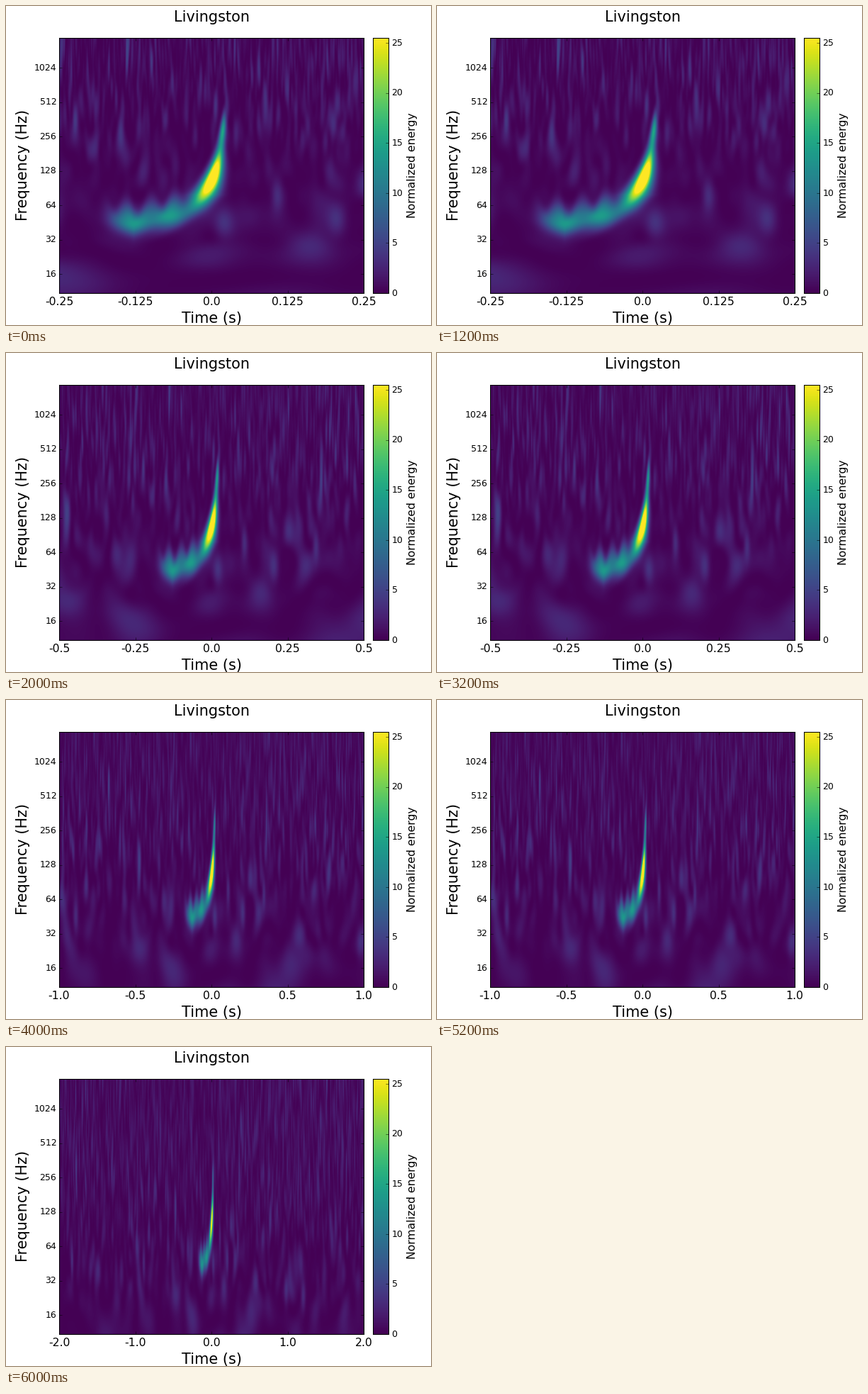
Animation, 600 px wide and 450 px high, one loop 8 s. Source, as a matplotlib script:

```python
import numpy as np
import matplotlib.pyplot as plt
from matplotlib.animation import FuncAnimation

W, H, DPI = 600, 450, 100
LEFT, RIGHT, TOP, BOTTOM = 75, 505.1, 45, 405
BAR_LEFT, BAR_RIGHT = 518, 540
CENTER = (LEFT + RIGHT) / 2
OCTAVE = 48.5          # pixels per octave
ENERGY_MAX = 25.5
COLS, ROWS = 430, 360
ZOOMS = 4
DT = 0.5 / COLS        # seconds per column in the closest view

plt.rcParams["font.family"] = "DejaVu Sans"


def freq_to_y(freq):
    return 87 + (10 - np.log2(freq)) * OCTAVE


def bell(x, sigma):
    return np.exp(-0.5 * (x / sigma) ** 2)


def rise(x, softness):
    return 0.5 + 0.5 * np.tanh(x / (2 * softness))


# The whole record: four seconds, in closest-view pixels around t = 0
half = COLS * 2 ** (ZOOMS - 1) // 2
x = np.arange(2 * half) + 0.5 - half
y = np.arange(ROWS)[:, None] + TOP + 0.5
freq = 2 ** (10 - (y - 87) / OCTAVE)


def tile_width(f):
    """Time spread of the noise, which grows towards low frequencies."""
    return 0.8 + 800 / f


def make_noise():
    rng = np.random.default_rng(14)
    size = (ROWS, 2 * half)
    field = rng.standard_normal(size) + 1j * rng.standard_normal(size)
    field = bell(y - y.T, 19) @ field
    omega = 2 * np.pi * np.fft.fftfreq(2 * half)
    field = np.fft.ifft(np.fft.fft(field, axis=1) * bell(omega * tile_width(freq), 1), axis=1)
    energy = np.abs(field) ** 2
    energy /= energy.mean(axis=1, keepdims=True)
    level = 0.65 + 0.3 * rise(np.log2(freq / 160), 0.4)
    return 6 * np.tanh(energy * level / 6)


def make_chirp():
    """Merger: time left falls as a power of frequency, with a short bright tail."""
    place = 20.4 - 22 * (100 / freq) ** 1.4
    width = np.minimum(12, 8 * (114 / freq) ** 1.1)
    energy = 33 * bell(y - 242, 29) + 12 * bell(y - 176, 15)
    return energy * bell(x - place, width)


def make_inspiral():
    """Low band before the merger, with regular fingers on its upper edge."""
    ridge = 308 - 0.25 * np.abs(x + 110)
    above = 14 + 4 * np.cos(2 * np.pi * (x + 120) / 34)
    beads = 1 + 0.12 * np.cos(2 * np.pi * (x + 110) / 50)
    energy = 12 * beads * rise(x + 140, 7) * rise(-42 - x, 6)
    return energy * bell(y - ridge, np.where(y < ridge, above, 11))


# time (s) and frequency (Hz) of the clearest stray blobs
GLITCHES = [(0.02, 46), (0.107, 80), (0.205, 47), (0.342, 75),
            (-0.89, 45), (-1.83, 48), (0.975, 27), (1.2, 24)]


def make_record():
    record = make_noise() + make_chirp() + make_inspiral()
    for t, f in GLITCHES:
        record += 3 * bell(y - freq_to_y(f), 15) * bell(x - t / DT, tile_width(f) / 2)
    return record


def make_view(record, zoom):
    step = 2 ** zoom
    view = record[:, half - COLS // 2 * step + step // 2:][:, ::step][:, :COLS]
    if zoom:
        edge = np.pad(view, ((0, 0), (1, 1)), mode="edge")
        view = 0.15 * edge[:, :-2] + 0.7 * view + 0.15 * edge[:, 2:]
    return view


fig = plt.figure(figsize=(W / DPI, H / DPI), dpi=DPI, facecolor="white")


def pixel_axes(left, right):
    ax = fig.add_axes([left / W, 1 - BOTTOM / H, (right - left) / W, (BOTTOM - TOP) / H])
    for spine in ax.spines.values():
        spine.set_linewidth(0.75)
    ax.tick_params(direction="in", length=3, width=0.375, labelleft=False,
                   labelbottom=False, labelright=False)
    return ax


def label(px, baseline, text, size, ha="center", rotation=0):
    return fig.text(px / W, 1 - baseline / H, text, size=size, ha=ha, va="baseline",
                    rotation=rotation, rotation_mode="anchor")


record = make_record()
views = [make_view(record, zoom) for zoom in range(ZOOMS)]

ax = pixel_axes(LEFT, RIGHT)
image = ax.imshow(views[0], cmap="viridis", vmin=0, vmax=ENERGY_MAX, aspect="auto",
                  interpolation="bilinear", extent=(LEFT, RIGHT, BOTTOM, TOP))
ax.tick_params(top=True, right=True)
tick_x = np.linspace(LEFT, RIGHT, 5)
ax.set_xticks(tick_x)
bands = [2 ** n for n in range(4, 11)]
ax.set_yticks([freq_to_y(f) for f in bands])
for f in bands:
    label(71.3, freq_to_y(f) + 3.8, str(f), 9, ha="right")
time_labels = [label(px, 421.7, "", 11.25) for px in tick_x]

bar = pixel_axes(BAR_LEFT, BAR_RIGHT)
bar.imshow(np.linspace(0, 1, 256)[:, None], cmap="viridis", aspect="auto",
           origin="lower", extent=(0, 1, 0, ENERGY_MAX))
bar.set_xticks([])
bar.yaxis.tick_right()
bar.tick_params(labelright=False)
bar.set_yticks(range(0, 26, 5))
for value in range(0, 26, 5):
    level = BOTTOM - value / ENERGY_MAX * (BOTTOM - TOP)
    label(544.5, level + 3.8, str(value), 9, ha="left")

label(CENTER, 22, "Livingston", 15)
label(CENTER, 446.5, "Time (s)", 15)
label(30.2, 224.3, "Frequency (Hz)", 15, rotation=90)
label(578, 225, "Normalized energy", 11.25, rotation=90)


def update(zoom):
    image.set_data(views[zoom])
    span = 0.25 * 2 ** zoom
    for k, text in enumerate(time_labels):
        text.set_text(str(span * (k - 2) / 2))
    return [image, *time_labels]


anim = FuncAnimation(fig, update, frames=ZOOMS, interval=2000, repeat=True, repeat_delay=0)
plt.show()
```
